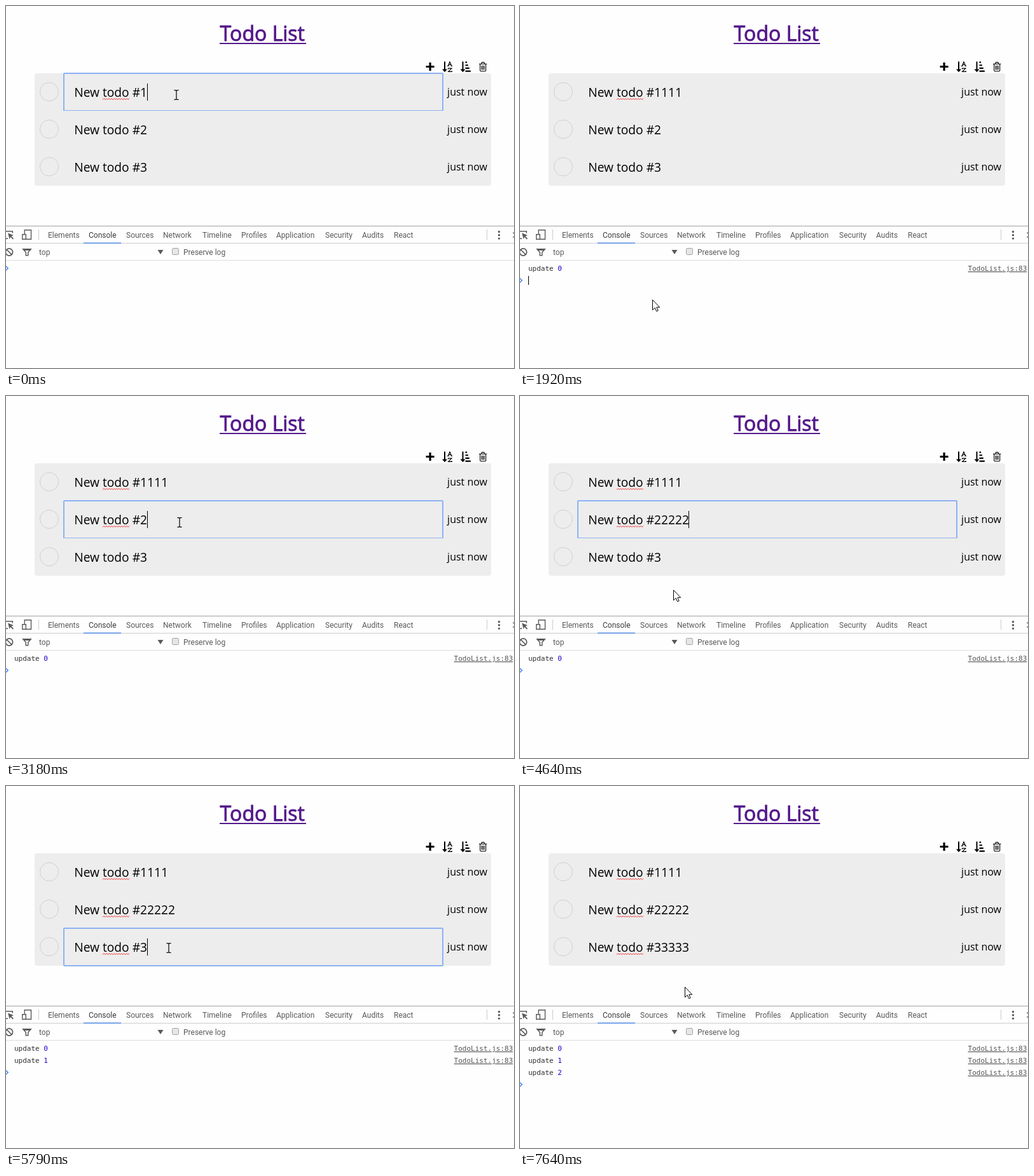
These frames come from a looping animation (799x570 px, 8 s). An HTML page:

```html
<!DOCTYPE html>
<html lang="en">
<head>
<meta charset="utf-8">
<title>Todo List</title>
<style>
  html, body { margin: 0; width: 100%; height: 100%; overflow: hidden; background: #fefefe; }
  svg { display: block; }
  .title { font: 32px "Open Sans", sans-serif; fill: #551a8b; stroke: #551a8b; stroke-width: .9; }
  .todo { font: 19.2px "Open Sans", sans-serif; }
  .age { font: 16px "Open Sans", sans-serif; text-anchor: end; }
  .ui { font: 12px Roboto, sans-serif; fill: #5a5a5a; }
  .log { font: 11px "DejaVu Sans Mono", monospace; fill: #303030; }
  .log .num { fill: #1c00cf; }
  .log .link { fill: #545454; text-decoration: underline; text-anchor: end; }
  .line { fill: none; stroke: #5a5a5a; }
  .icon { fill: none; stroke: #000; }
</style>
</head>
<body>
<svg id="stage" width="799" height="570" viewBox="0 0 799 570">
  <text class="title" x="336.6" y="55">Todo List</text>
  <rect x="336" y="58" width="136" height="2" fill="#551a8b"/>

  <g id="tools">
    <path class="icon" stroke-width="3.2" d="M660.6 95.5h13M667.1 89v13"/>
    <g id="sortAlpha">
      <path class="icon" stroke-width="2" d="M690 87.5V101"/>
      <path d="M686 99.5h8l-4 4.7z"/>
      <path class="icon" stroke-width="1.2" d="M695.2 94.5L698 88l2.9 6.5M696.2 92.3h3.7M694 94.5h2.6M699.4 94.5h2.8M695.6 99.5v-1.4h5.3l-5.2 5.3h5.5V102"/>
    </g>
    <g id="sortAmount">
      <path class="icon" stroke-width="2" d="M718.5 87.5V101"/>
      <path d="M714.5 99.5h8l-4 4.7z"/>
      <path class="icon" stroke-width="2.1" d="M722.5 88.6h2.6M722.5 93.2h4.4M722.5 97.9h6.3M722.5 102.6h8.4"/>
    </g>
    <path class="icon" stroke-width="1.1" d="M744 91.2h12.4M747.7 91l.9-2.4h3.2l.9 2.4M745.7 91.5v9.8q0 1.5 1.4 1.5h6.2q1.4 0 1.4-1.5v-9.8M748.2 93.8v6.6M750.2 93.8v6.6M752.2 93.8v6.6"/>
  </g>

  <rect x="45" y="106" width="718" height="177" rx="4" fill="#ededed"/>
  <g id="rows"></g>
  <svg id="ring" x="90" width="598" overflow="hidden">
    <rect x="1" y="1" width="596" height="59" rx="1" fill="none" stroke="#8db2f4" stroke-width="2"/>
  </svg>
  <rect id="caret" width="1" height="27"/>

  <rect id="hover" x="181" y="347" width="58" height="26" fill="#e4e4e4"/>
  <path class="line" style="stroke:#a3a3a3" d="M0 346.5h799"/>
  <path class="line" style="stroke:#ccc" d="M0 373.5h799M51.5 352v16M756.5 352v16"/>
  <path class="line" style="stroke:#ddd" d="M0 400.5h799"/>
  <rect x="122" y="372.6" width="59" height="1.4" fill="#4481e0"/>
  <g id="tabs" class="ui"></g>

  <path class="line" stroke-width="1.4" d="M0 354.7h10.3v3M0 366.3h3"/>
  <path fill="#5a5a5a" d="M3 357.5l9 3.4-3.6 1.6 3.6 3.6-1.3 1.3-3.6-3.7-1.6 3.4z"/>
  <path class="line" stroke-width="1.4" d="M29.2 359v-6.3h10.3v14.6h-8M25.7 359.7h5.6v7.6h-5.6z"/>
  <g fill="#5a5a5a">
    <circle cx="775.5" cy="355.5" r="1.7"/>
    <circle cx="775.5" cy="360.8" r="1.7"/>
    <circle cx="775.5" cy="366.1" r="1.7"/>
  </g>
  <path class="line" stroke-width="1.4" d="M797.5 356.5l8 8M797.5 364.5l8-8"/>

  <circle class="line" cx="5" cy="387.5" r="5.6" stroke-width="1.7"/>
  <path class="line" stroke-width="1.7" d="M1 383.5l8 8"/>
  <path class="line" stroke-width="1.5" d="M26.8 382.8h12.4l-4.5 5.2v4.8h-3.4V388zM28 384.3h10"/>
  <text class="ui" x="52" y="392">top</text>
  <path fill="#5a5a5a" d="M238.5 384h9l-4.5 7z"/>
  <rect x="261.5" y="381.5" width="10" height="10" rx="2" fill="#e6e6e6" stroke="#a0a0a0"/>
  <text class="ui" x="279" y="392">Preserve log</text>

  <g id="logs" class="log"></g>
  <g id="prompt">
    <path fill="none" stroke="#4285f4" stroke-width="1.5" d="M-.5 409.5l3.7 3.5-3.7 3.5"/>
    <rect id="logCaret" x="13" y="406" width="1" height="14"/>
  </g>

  <path id="arrow" fill="#fff" stroke="#000" d="M.5.7v16l3.7-3.5 2.5 5.5 2.5-1.1-2.4-5.3h4.9z"/>
  <path id="beam" class="icon" stroke-width="1.2" d="M-3.5-7.4H-1l1 1 1-1h2.5M0-6.4V6.4M-3.5 7.4H-1l1-1 1 1h2.5"/>
</svg>
<script>
const LOOP = 8000, ROW = 59, LINE = 19, DIGIT = 10.95;
const NS = "http://www.w3.org/2000/svg";
const $ = id => document.getElementById(id);

function add(parent, tag, attrs, text = "") {
  const el = document.createElementNS(NS, tag);
  for (const key in attrs) el.setAttribute(key, attrs[key]);
  el.textContent = text;
  return parent.appendChild(el);
}
const show = (el, on) => el.setAttribute("visibility", on ? "visible" : "hidden");
const move = (el, x, y) => el.setAttribute("transform", `translate(${x} ${y})`);

const tabs = { Elements: 66, Console: 130, Sources: 189, Network: 247, Timeline: 309, Profiles: 370,
  Application: 425, Security: 502, Audits: 560, React: 610 };
for (const name in tabs) {
  const tab = add($("tabs"), "text", { x: tabs[name], y: 365 }, name);
  if (name === "Console") tab.style.fill = "#3c3c3c";
}

const wave = "M152 147.5" + "l2-2 2 2".repeat(10) + "l2-2";

const rows = [0, 1, 2].map(i => {
  const g = add($("rows"), "g", { transform: `translate(0 ${ROW * i})` });
  add(g, "circle", { cx: 68, cy: 135, r: 14.5, fill: "none", stroke: "#d0d0d0" });
  add(g, "text", { class: "age", x: 757, y: 141 }, "just now");
  return {
    text: add(g, "text", { class: "todo", x: 107.2, y: 143 }),
    wave: add(g, "path", { d: wave, fill: "none", stroke: "#f03030" })
  };
});

const logs = [0, 1, 2].map(i => {
  const g = add($("logs"), "g", { transform: `translate(0 ${LINE * i})` });
  add(g, "text", { x: 13, y: 417 }, "update");
  add(g, "text", { class: "num", x: 59.3, y: 417 }, i);
  add(g, "text", { class: "link", x: 797.3, y: 417 }, "TodoList.js:83");
  return g;
});

// Each step changes part of the state: mouse, digits per row, focused row,
// caret, checked rows, log lines, console caret, tab hover.
const steps = [
  [0, { mouse: [268, 140], n: [1, 1, 1], focus: 0, caret: 1, checked: 1, log: 0, logCaret: 0, hover: 0 }],
  [470, { caret: 0 }],
  [930, { caret: 1, n: [2, 1, 1] }],
  [1070, { n: [3, 1, 1] }],
  [1210, { n: [4, 1, 1], mouse: [254, 190] }],
  [1340, { mouse: [251, 323] }],
  [1490, { mouse: [236, 400] }],
  [1640, { mouse: [213, 458] }],
  [1780, { mouse: [209, 465], focus: -1, log: 1, logCaret: 1 }],
  [1920, { mouse: [208, 462] }],
  [2070, { mouse: [204, 440] }],
  [2210, { mouse: [198, 390] }],
  [2340, { mouse: [192, 338], hover: 1 }],
  [2460, { mouse: [205, 300], hover: 0, logCaret: 0 }],
  [2610, { mouse: [238, 235] }],
  [2760, { mouse: [262, 190] }],
  [2910, { mouse: [270, 181] }],
  [3060, { mouse: [273, 199], logCaret: 1 }],
  [3180, { focus: 1, checked: 2, logCaret: 0 }],
  [3710, { caret: 0 }],
  [3860, { caret: 1, n: [4, 2, 1] }],
  [4010, { n: [4, 3, 1] }],
  [4160, { n: [4, 4, 1] }],
  [4310, { n: [4, 5, 1], mouse: [270, 215] }],
  [4480, { mouse: [255, 265] }],
  [4640, { mouse: [241, 305] }],
  [4780, { focus: -1, log: 2 }],
  [5220, { mouse: [242, 298] }],
  [5360, { mouse: [248, 275] }],
  [5500, { mouse: [254, 260] }],
  [5640, { mouse: [256, 255] }],
  [5790, { focus: 2, checked: 3 }],
  [6230, { caret: 0 }],
  [6510, { caret: 1, n: [4, 5, 2] }],
  [6650, { n: [4, 5, 3] }],
  [6800, { n: [4, 5, 4] }],
  [6950, { n: [4, 5, 5], mouse: [258, 280] }],
  [7090, { mouse: [259, 316] }],
  [7490, { focus: -1, log: 3 }]
];

function draw(s) {
  rows.forEach((row, i) => {
    row.text.textContent = "New todo #" + String(i + 1).repeat(s.n[i]);
    show(row.wave, i < s.checked);
  });
  logs.forEach((line, i) => show(line, i < s.log));
  move($("prompt"), 0, LINE * s.log);
  show($("logCaret"), s.logCaret);
  show($("hover"), s.hover);

  const focused = s.focus >= 0;
  show($("ring"), focused);
  show($("caret"), focused && s.caret);
  if (focused) {
    $("ring").setAttribute("y", 105 + ROW * s.focus);
    $("ring").setAttribute("height", s.focus < 2 ? 60 : 61); // the next row covers the lower edge
    move($("caret"), Math.floor(222 + DIGIT * (s.n[s.focus] - 1)), 122 + ROW * s.focus);
  }

  const [x, y] = s.mouse, overList = y > 106 && y < 283;
  show($("beam"), overList);
  show($("arrow"), !overList);
  move(overList ? $("beam") : $("arrow"), x, y);
}

const start = performance.now();
let shown = -1;
function tick() {
  const t = (performance.now() - start) % LOOP;
  const past = steps.filter(([at]) => at <= t);
  if (past.length !== shown) {
    shown = past.length;
    draw(Object.assign({}, ...past.map(step => step[1])));
  }
  requestAnimationFrame(tick);
}
tick();
</script>
</body>
</html>
```
